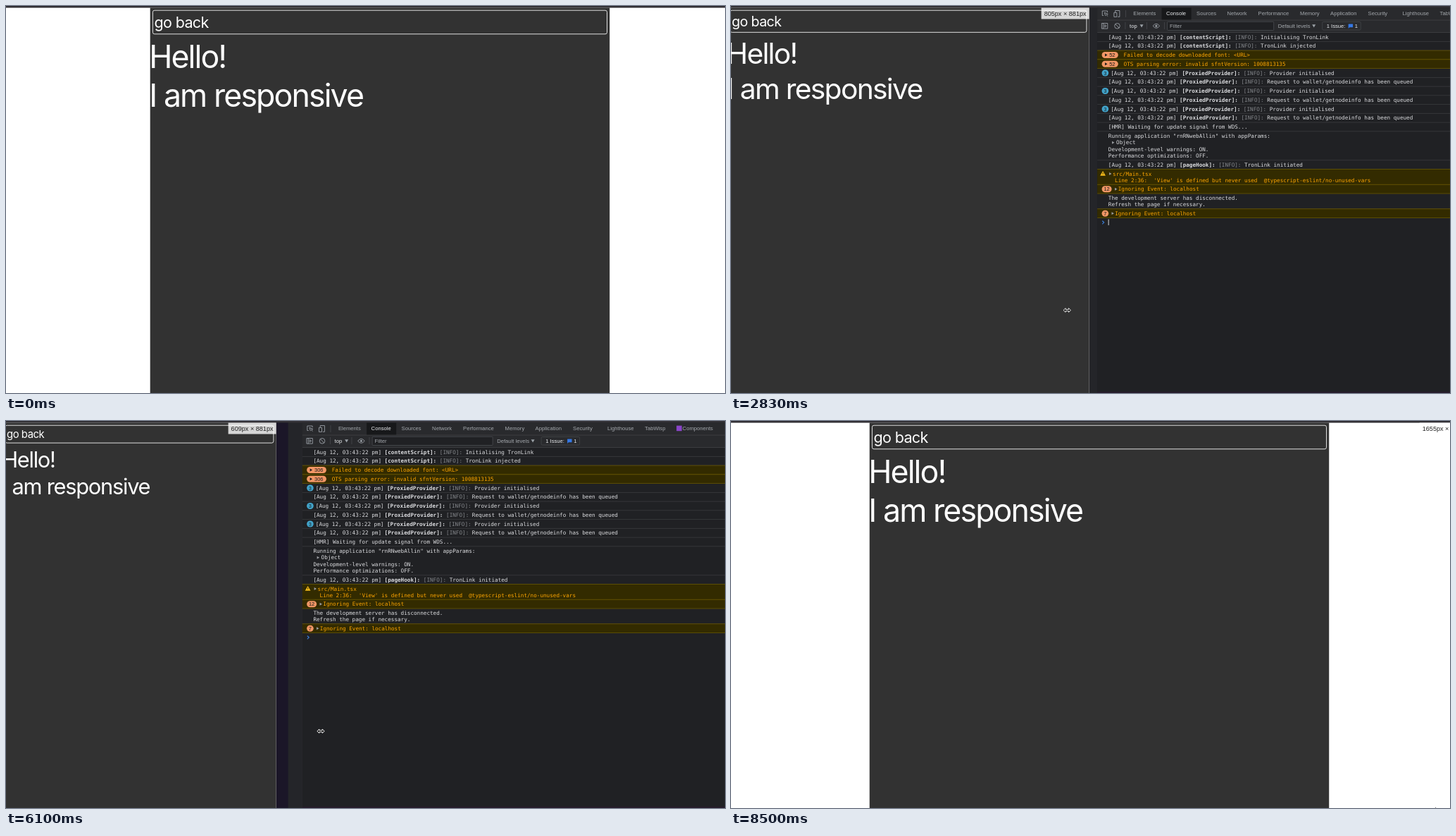
Write an HTML page that moves like this. It is 1021 px wide and 549 px high and loops after 8750 ms.

```html
<!DOCTYPE html>
<html lang="en">
<head>
<meta charset="utf-8">
<title>Responsive page</title>
<style>
html, body { margin: 0; width: 100%; height: 100%; overflow: hidden; background: #fff; }
svg { display: block; width: 100%; height: 100%; }
text { white-space: pre; }
.page { font-family: Inter, "Noto Sans", sans-serif; font-optical-sizing: none; fill: #fff; }
.ui { font: 7.65px "Liberation Sans", Arial, sans-serif; fill: #a4a8ad; }
.lit { fill: #e8eaed; }
.size { font: 9.1px "Liberation Sans", Arial, sans-serif; fill: #222; }
.log { font: 7.65px "DejaVu Sans Mono", "Liberation Mono", monospace; fill: #dcdde0; }
.warn { fill: #ffa600; }
.b { font-weight: bold; }
.g { fill: #85888c; }
.badge { font: 7.4px "Liberation Sans", Arial, sans-serif; fill: #17181a; text-anchor: middle; }
.icon { fill: none; stroke: #9aa0a6; stroke-width: .9; }
</style>
</head>
<body>
<svg id="stage" viewBox="0 0 1021 549" preserveAspectRatio="none"></svg>
<script>
const stage = document.getElementById("stage");
const LOOP = 8750, TICK = 149.2, FIRST = 430;
const SCALE = 0.6378, ORIGIN = -4.8, CHAR = 4.607, WRAP_EDGE = 1132;
const TOP = 2.5;

// Tracks are [tick, value] pairs, joined linearly.
const pageWidth = [[-1, 1680], [0, 1676], [2, 1630], [4, 1540], [7, 1379], [9, 1215], [11, 1050],
  [15, 850], [19, 670], [22, 580], [26, 360], [29, 228], [30, 212], [31, 216], [33, 290],
  [36, 460], [38, 609], [42, 1125], [45, 1401], [48, 1600], [50, 1655]];
const dockLag = [[-1, 0], [7, 15], [11, 22], [20, 3], [22, .6], [29, -1.9], [31, 3], [38, 37],
  [42, .3], [45, 15], [50, 0]];
const errors = [[0, 1], [7, 7], [11, 21], [22, 90], [29, 195], [38, 306], [42, 345], [50, 380]];
const mouseX = [[-1, 1080], [3, 1015], [7, 850], [11, 600], [22, 330], [29, 137], [31, 132],
  [38, 447], [42, 783], [45, 920], [50, 1000]];
const mouseY = [[-1, 440], [11, 437], [22, 425], [29, 415], [38, 440], [42, 458], [45, 470],
  [50, 507], [51, 507], [52, 520], [54, 547]];

function at(track, k) {
  if (k <= track[0][0]) return track[0][1];
  for (let i = 1; i < track.length; i++) {
    const [k0, v0] = track[i - 1], [k1, v1] = track[i];
    if (k <= k1) return v0 + (v1 - v0) * (k - k0) / (k1 - k0);
  }
  return track[track.length - 1][1];
}

const n = v => +v.toFixed(2);
const esc = s => s.replace(/&/g, "&amp;").replace(/</g, "&lt;");
const rect = (x, y, w, h, fill, more = "") =>
  w > 0 ? `<rect x="${n(x)}" y="${n(y)}" width="${n(w)}" height="${n(h)}" fill="${fill}" ${more}/>` : "";
const text = (x, y, s, cls, more = "") =>
  `<text x="${n(x)}" y="${n(y)}" class="${cls}" ${more}>${esc(s)}</text>`;
const path = (d, more) => `<path d="${d}" ${more}/>`;
const shift = (x, y, s) => `<g transform="translate(${n(x)} ${n(y)})">${s}</g>`;
const vline = (x, y) => rect(x, y, .7, 10, "#4b4d51");
const down = (x, y) => path(`M${n(x)} ${y}h5l-2.5 4.2z`, 'fill="#9aa0a6"');
const play = (x, y, fill) => path(`M${n(x)} ${n(y - 2)}l3.4 2l-3.4 2z`, `fill="${fill}"`);

// Console rows
const line = (dx, ...parts) => ({ dx, parts });
const plain = s => line(15.8, [s, ""]);
const entry = (tag, msg, count) => ({
  count, color: "#42a5cc",
  lines: [line(count ? 19.2 : 15.8, ["[Aug 12, 03:43:22 pm] ", ""], [`[${tag}]: `, "b"], ["[INFO]: ", "g"], [msg, ""])]
});
const failure = (msg, count) => ({
  warn: true, count, color: "#f29766", fold: true,
  lines: [line(28.3 + 4.6 * String(count).length, [msg, ""])]
});
const ignored = count => {
  const x = count > 9 ? 29.7 : 25.2;
  return { warn: true, count, color: "#f29766", arrow: [x - 4.8, 0],
    lines: [line(x, ["Ignoring Event: localhost", ""])] };
};

function rowsFor(count) {
  const provider = [
    entry("ProxiedProvider", "Provider initialised", 3),
    entry("ProxiedProvider", "Request to wallet/getnodeinfo has been queued")
  ];
  return [
    entry("contentScript", "Initialising TronLink"),
    entry("contentScript", "TronLink injected"),
    failure("Failed to decode downloaded font: <URL>", count),
    failure("OTS parsing error: invalid sfntVersion: 1008813135", count),
    ...provider, ...provider, ...provider,
    { lines: [plain("[HMR] Waiting for update signal from WDS...")] },
    { step: 9.4, arrow: [21, 9.4], lines: [
      plain('Running application "rnRNwebAllin" with appParams:'),
      line(27, ["Object", ""]),
      plain("Development-level warnings: ON."),
      plain("Performance optimizations: OFF.")] },
    entry("pageHook", "TronLink initiated"),
    { warn: true, sign: true, arrow: [17, 0], lines: [
      line(22, ["src/Main.tsx", ""]),
      line(25, ["Line 2:36:  'View' is defined but never used  @typescript-eslint/no-unused-vars", ""])] },
    ignored(12),
    { lines: [plain("The development server has disconnected."), plain("Refresh the page if necessary.")] },
    ignored(7)
  ];
}

function wrap({ dx, parts }, left) {
  const max = Math.max(12, Math.floor((WRAP_EDGE - left - dx) / CHAR));
  const out = [{ dx, spans: [] }];
  let col = 0;
  for (const [s, cls] of parts) {
    for (const word of s.match(/\S+\s*/g)) {
      if (col && col + word.trimEnd().length > max) {
        out.push({ dx: 15.8, spans: [] });
        col = 0;
      }
      const spans = out[out.length - 1].spans, last = spans[spans.length - 1];
      if (last && last[1] === cls) last[0] += word;
      else spans.push([word, cls]);
      col += word.length;
    }
  }
  return out;
}

function badge(row, y) {
  const label = String(row.count);
  const w = row.fold ? 14 + 4.6 * label.length : label.length > 1 ? 14 : 9.6;
  const mid = row.fold ? 6.5 + w / 2 + 3.2 : 6.5 + w / 2;
  return rect(6.5, y - 4.5, w, 9, row.color, 'rx="4.5"') +
    (row.fold ? play(11, y, "#17181a") : "") +
    text(mid, y + 2.7, label, row.fold ? "badge b" : "badge");
}

function consoleRows(left, count, caret) {
  const width = 1100;
  let y = 37.6, out = "";
  for (const row of rowsFor(count)) {
    const lines = row.lines.flatMap(l => wrap(l, left));
    const step = row.step || 9, h = 12.75 + step * (lines.length - 1), mid = y + 6.4;
    if (row.warn) out += rect(0, y, width, h, "#332b00") + rect(0, y - .4, width, .8, "#665500");
    out += rect(0, y + h - .4, width, .8, row.warn ? "#665500" : "#3a3b3e");
    if (row.count) out += badge(row, mid);
    if (row.sign) out += path(`M8 ${n(mid - 4)}l3.9 6.8h-7.8z`, 'fill="#f7bd1b"') +
      rect(7.6, mid - 1.6, .9, 2.4, "#332b00");
    if (row.arrow) out += play(row.arrow[0], mid + row.arrow[1], "#9a9da1");
    lines.forEach((l, i) => {
      const spans = l.spans.map(([s, c]) => `<tspan class="${c}">${esc(s)}</tspan>`).join("");
      out += `<text x="${n(l.dx)}" y="${n(mid + i * step + 2.6)}" class="log${row.warn ? " warn" : ""}">${spans}</text>`;
    });
    y += h;
  }
  out += path(`M7.2 ${n(y + 4.2)}l2.4 2.3l-2.4 2.3`, 'fill="none" stroke="#3b82e0" stroke-width="1.1"');
  if (caret) out += rect(15.6, y + 2, .9, 8.5, "#e8eaed");
  return out;
}

const tabs = [["Elements", 51.3], ["Console", 98], ["Sources", 141], ["Network", 184.5],
  ["Performance", 228.5], ["Memory", 288], ["Application", 331], ["Security", 384.5],
  ["Lighthouse", 433.5], ["TabWisp", 486.5], ["Components", 540], ["Profiler", 609]];

function toolbars(left) {
  const filter = 182 - .2 * (left - 365.7), end = 99.5 + filter;
  let s = rect(0, TOP, 1100, 35, "#292a2d") + rect(91.5, TOP, 42, 17.5, "#17181a");
  for (const [name, x] of tabs) s += text(x, 13.2, name, name === "Console" ? "ui lit" : "ui");
  s += rect(531.5, 6.6, 7.6, 7.6, "#8a45c9") + rect(600.5, 6.6, 7.6, 7.6, "#8a45c9");
  s += path("M9 13.5H7.2V7h7.3v2.2M10.2 9.3l5 2.2l-2.2.7l1.7 2.4M10.2 9.3l1.6 4.8", 'class="icon"');
  s += path("M25.6 9V6.5h6.2v8.8h-2.6M23.8 9.4h4v6h-4z", 'class="icon"');
  s += vline(40, 6) + rect(0, 19.7, 1100, .7, "#45474a") + rect(0, 37, 1100, .7, "#45474a");
  s += path("M6.3 24.5h8.4v7.6H6.3zM8.6 24.5v7.6M10.6 26.4l2.4 1.9l-2.4 1.9z", 'class="icon"');
  s += '<circle cx="28.4" cy="28.3" r="3.8" class="icon"/>' + path("M25.8 25.6l5.2 5.4", 'class="icon"');
  s += vline(39.5, 23) + text(46, 30.9, "top", "ui lit") + down(60.5, 26.3) + vline(70, 23);
  s += path("M79 28.3q4.8-6 9.6 0q-4.8 6-9.6 0z", 'class="icon"') +
    '<circle cx="83.8" cy="28.3" r="1.5" fill="#9aa0a6"/>' + vline(95, 23);
  s += rect(99.5, 22.3, filter, 12.2, "#202124", 'stroke="#4b4d51" stroke-width=".8" rx=".8"');
  s += text(103, 31, "Filter", "ui");
  s += text(end + 6, 30.9, "Default levels", "ui") + down(end + 54.5, 26.3);
  s += rect(end + 69, 22.5, 54.5, 11.5, "none", 'stroke="#45474a" stroke-width=".8" rx="1.5"');
  s += text(end + 75, 30.9, "1 Issue:", "ui lit") + text(end + 115, 30.9, "1", "ui lit");
  s += path(`M${n(end + 106)} 25.4h6.4v4.8h-4.7l-1.7 1.7z`, 'fill="#3578e5"');
  return s;
}

function devtools(left, count, caret) {
  return shift(left, 0, rect(0, TOP, 1100, 547, "#202124") + consoleRows(left, count, caret) +
    toolbars(left) + rect(0, 547.3, 1100, 2, "#261b2c"));
}

function page(width) {
  const full = width * SCALE, right = ORIGIN + full;
  const box = Math.min(full, 652.5), left = ORIGIN + (full - box) / 2;
  const unit = Math.min(width, 881);
  const small = Math.max(8.1, unit * .0244), big = unit * .0507;
  const height = 6 + 1.3 * small, base = 9.2 + height + big * 1.01;
  const track = -.042 + Math.max(0, 20 - big) * .0038;
  const style = (size, gap) => `font-size="${n(size)}" style="letter-spacing:${gap.toFixed(4)}em"`;
  const head = (y, s) => text(left - big * .035, y, s, "page", style(big, track));
  return rect(0, TOP, right, 547, "#fff") +
    rect(left, TOP, box, 547, "#323232") +
    rect(left + 3.7, 6.2, box - 7.4, height - .4, "none", 'rx="2.5" stroke="#f2f2f2" stroke-width=".9"') +
    text(left + 5.8, 6 + height / 2 + small * .36, "go back", "page", style(small, -.03)) +
    head(base, "Hello!") + head(base + big * 1.23, "I am responsive");
}

function sizeLabel(width, right) {
  const label = `${Math.round(width)}px × 881px`;
  const w = label.length > 13 ? 73 : 68;
  return rect(right - w, TOP, w, 16, "#fff", 'fill-opacity=".8"') +
    text(right - w + 4, 14, label, "size");
}

function cursor(k) {
  const arrow = (k >= 9 && k <= 12) || (k >= 28 && k <= 31) || k >= 50;
  const d = arrow
    ? "M0 0v8.8l2-1.9l1.5 3.4l1.5-.7l-1.5-3.3h2.8z"
    : "M-5.2 0l3-2.8v1.7h4.4v-1.7l3 2.8l-3 2.8v-1.7h-4.4v1.7z";
  return shift(at(mouseX, k), at(mouseY, k),
    path(d, 'fill="#111" stroke="#fff" stroke-width=".9" stroke-linejoin="round"'));
}

function draw(k) {
  const width = at(pageWidth, k), right = ORIGIN + width * SCALE;
  const lag = at(dockLag, k), left = right + lag;
  const caret = k < 33 && (440 + k * TICK) % 1000 > 500;
  let s = rect(0, 0, 1021, 549, "#323035");
  if (left < 1021) s += devtools(left, Math.round(at(errors, k)), caret);
  s += rect(right, TOP, lag, 547, "#242529") + rect(right, TOP, lag - 20, 547, "#1b1628");
  s += page(width);
  if (k >= 0) s += sizeLabel(width, right) + cursor(k);
  stage.innerHTML = s;
}

let shown = null;
const start = performance.now();
function frame() {
  const t = (performance.now() - start) % LOOP;
  const k = Math.max(-1, Math.min(54, Math.floor((t - FIRST) / TICK)));
  if (k !== shown) draw(shown = k);
  requestAnimationFrame(frame);
}
frame();
</script>
</body>
</html>
```
